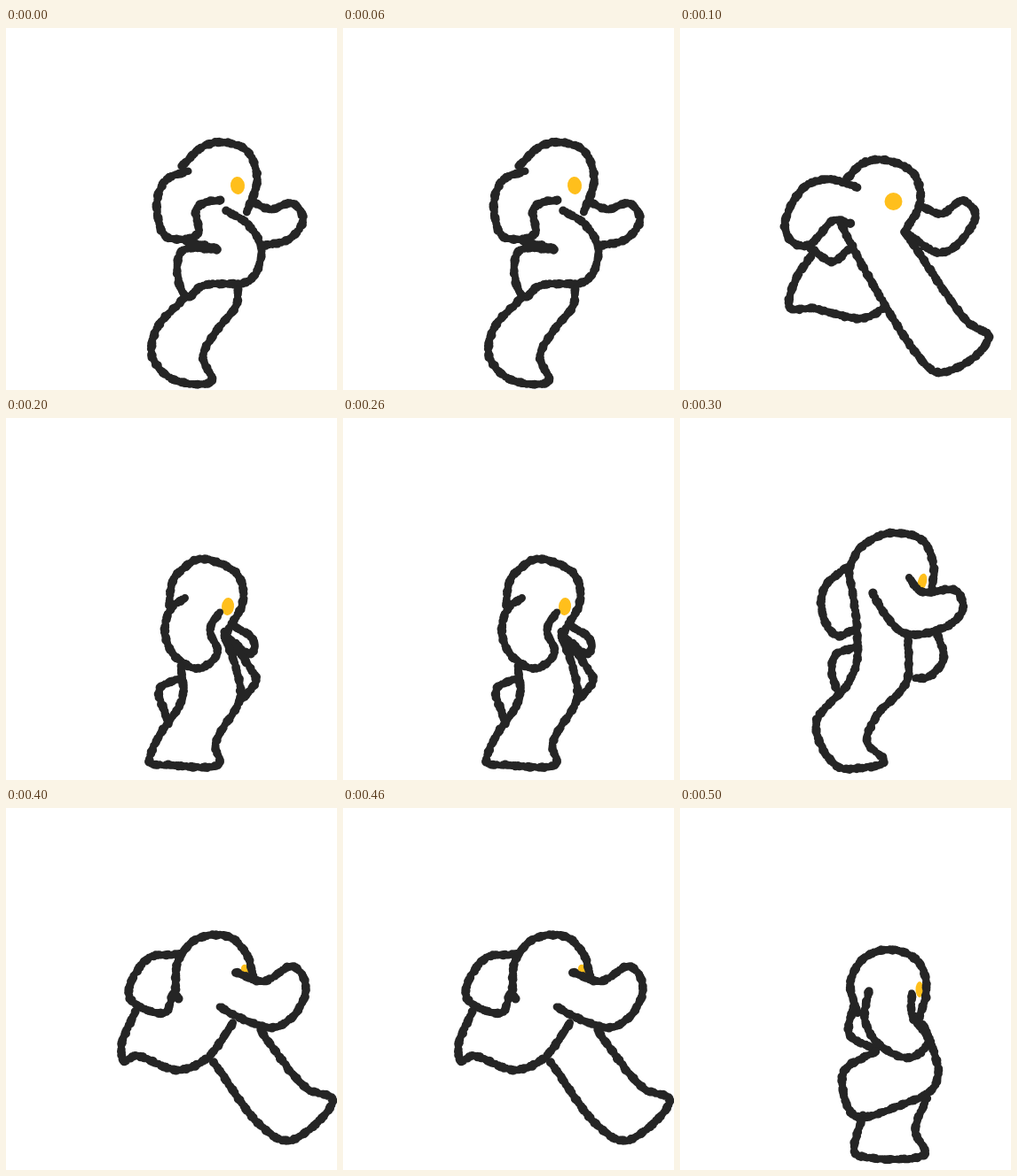
Write an HTML page with a canvas that moves like this. It is 373 px wide and 409 px high and loops after 600 ms.

```html
<!DOCTYPE html>
<html lang="en">
<head>
<meta charset="utf-8">
<title>Walk cycle</title>
<style>
  html, body { margin: 0; width: 100%; height: 100%; overflow: hidden; background: #fff; }
  canvas { display: block; width: 373px; height: 409px; }
</style>
</head>
<body>
<canvas id="stage" width="373" height="409"></canvas>
<script>
const HOLD = 100, INK = '#252525', YELLOW = '#ffbf1c';
const ctx = document.getElementById('stage').getContext('2d');

// Each pose: eye [x, y, rx, ry, tilt] and the key points of its brush strokes.
const poses = [
  { eye: [261, 178, 8, 10, -0.1], strokes: {
    head: '198,156 222,134 242,129 272,139 283,172 271,208',
    ear: '205,162 180,172 170,200 180,235 206,238 217,231 214,206 224,197 242,195',
    arm: '279,197 299,205 322,198 335,215 320,238 288,246',
    thigh: '248,206 274,223 288,252 275,285 222,291 204,304 193,277 199,251 238,250 203,241',
    shin: '200,306 169,341 165,372 190,398 232,399 222,372 235,345 259,314 262,295'
  } },
  { eye: [240.5, 196, 10, 10, 0], strokes: {
    head: '188,170 206,153 228,149 262,163 271,195 253,231',
    ear: '200,180 168,171 140,180 118,224 130,244 146,245 174,217 192,221',
    arm: '273,202 295,210 318,195 333,210 318,239 293,254 253,230',
    front: '180,219 212,280 266,367 290,389 330,373 348,348 325,333 272,258 254,231',
    back: '148,257 130,285 124,316 150,317 206,328 231,316',
    hip: '146,248 172,264 189,251'
  } },
  { eye: [250, 213, 7, 10, 0.1], strokes: {
    head: '184,212 189,182 215,160 232,161 262,178 267,208 246,246',
    ear: '202,203 186,215 179,242 191,270 218,283 238,266 230,238 241,219',
    arm: '259,237 276,247 280,258 275,267 257,254',
    back: '246,242 276,284 282,296 268,316',
    front: '246,246 259,282 264,316 236,368 240,391 185,392 162,389 175,355 195,326 200,310 197,280',
    heel: '197,294 173,306 184,346'
  } },
  { eye: [273, 185, 5, 9.5, 0.25], strokes: {
    head: '190,170 205,145 238,130 274,139 286,170 284,190',
    trunk: '258,180 272,196 311,195 319,215 303,234 255,244 234,226 217,198',
    ear: '186,170 166,187 159,205 166,235 178,246 197,239',
    body: '189,168 198,222 199,276 188,302 154,342 160,372 178,394 197,396 230,388 211,366 222,336 249,308 257,292 257,248',
    heel: '197,259 175,268 171,285 176,306',
    back: '290,243 297,272 281,292 265,294'
  } },
  { eye: [270, 183, 5, 6.5, -0.4], strokes: {
    head: '191,207 194,173 215,148 250,145 271,165 279,191',
    trunk: '259,186 290,196 323,179 338,200 328,230 303,248 268,239 241,225',
    ear: '195,165 160,170 138,208 145,221 180,231 189,209 194,215',
    front: '146,230 130,268 133,286 146,280 193,296 225,284 256,243',
    back: '234,287 285,357 316,376 350,356 368,329 339,317 300,270 286,250'
  } },
  { eye: [270, 205, 4.5, 9, 0], strokes: {
    head: '200,232 192,198 208,169 238,160 268,173 278,203 270,237',
    trunk: '213,207 208,238 225,268 260,282 280,263 262,235 261,209',
    arm: '195,225 191,256 221,273',
    thigh: '220,275 184,299 197,348 248,336 284,318 291,300 283,266 274,244',
    shin: '206,347 197,380 198,391 276,391 265,365 278,328'
  } }
];

function seeded(seed) {
  return () => (seed = (seed * 16807) % 2147483647) / 2147483647;
}

// Centripetal spline through the key points, sampled about every two pixels.
function spline(text) {
  const pts = text.split(' ').map(p => p.split(',').map(Number));
  const dist = (p, q) => Math.hypot(q[0] - p[0], q[1] - p[1]);
  const mirror = (p, q) => p.map((v, j) => 2 * v - q[j]);
  const out = [];
  for (let i = 0; i < pts.length - 1; i++) {
    const b = pts[i], c = pts[i + 1];
    const a = pts[i - 1] || mirror(b, c), d = pts[i + 2] || mirror(c, b);
    const [u, v, w] = [dist(a, b), dist(b, c), dist(c, d)].map(Math.sqrt);
    const n = Math.ceil(dist(b, c) / 2);
    for (let k = 0; k < n; k++) {
      const t = k / n;
      out.push([0, 1].map(j => {
        const chord = c[j] - b[j];
        const m = chord + v * ((b[j] - a[j]) / u - (c[j] - a[j]) / (u + v));
        const e = chord + v * ((d[j] - c[j]) / w - (d[j] - b[j]) / (v + w));
        return b[j] + t * (m + t * (3 * chord - 2 * m - e + t * (m + e - 2 * chord)));
      }));
    }
  }
  out.push(pts[pts.length - 1]);
  return out;
}

// A row of blots whose size swells and shrinks gives the crayon edge.
function brush(points, rand) {
  const phase = rand() * 6;
  ctx.beginPath();
  points.forEach(([x, y], i) => {
    const px = x + rand() - 0.5, py = y + rand() - 0.5;
    const r = 4.3 + 0.5 * Math.sin(i + phase) + rand() * 0.6;
    ctx.moveTo(px + r, py);
    ctx.arc(px, py, r, 0, 7);
  });
  ctx.fill();
}

function draw(index) {
  const { eye: [x, y, rx, ry, tilt], strokes } = poses[index];
  const rand = seeded(101 + index * 37);
  ctx.fillStyle = '#fff';
  ctx.fillRect(0, 0, 373, 409);
  ctx.fillStyle = YELLOW;
  ctx.beginPath();
  ctx.ellipse(x, y, rx, ry, tilt, 0, 7);
  ctx.fill();
  ctx.fillStyle = INK;
  Object.values(strokes).forEach(s => brush(spline(s), rand));
}

const start = performance.now();
let shown = -1;
function tick() {
  const index = Math.floor((performance.now() - start) / HOLD) % poses.length;
  if (index !== shown) draw(shown = index);
  requestAnimationFrame(tick);
}
tick();
</script>
</body>
</html>
```
